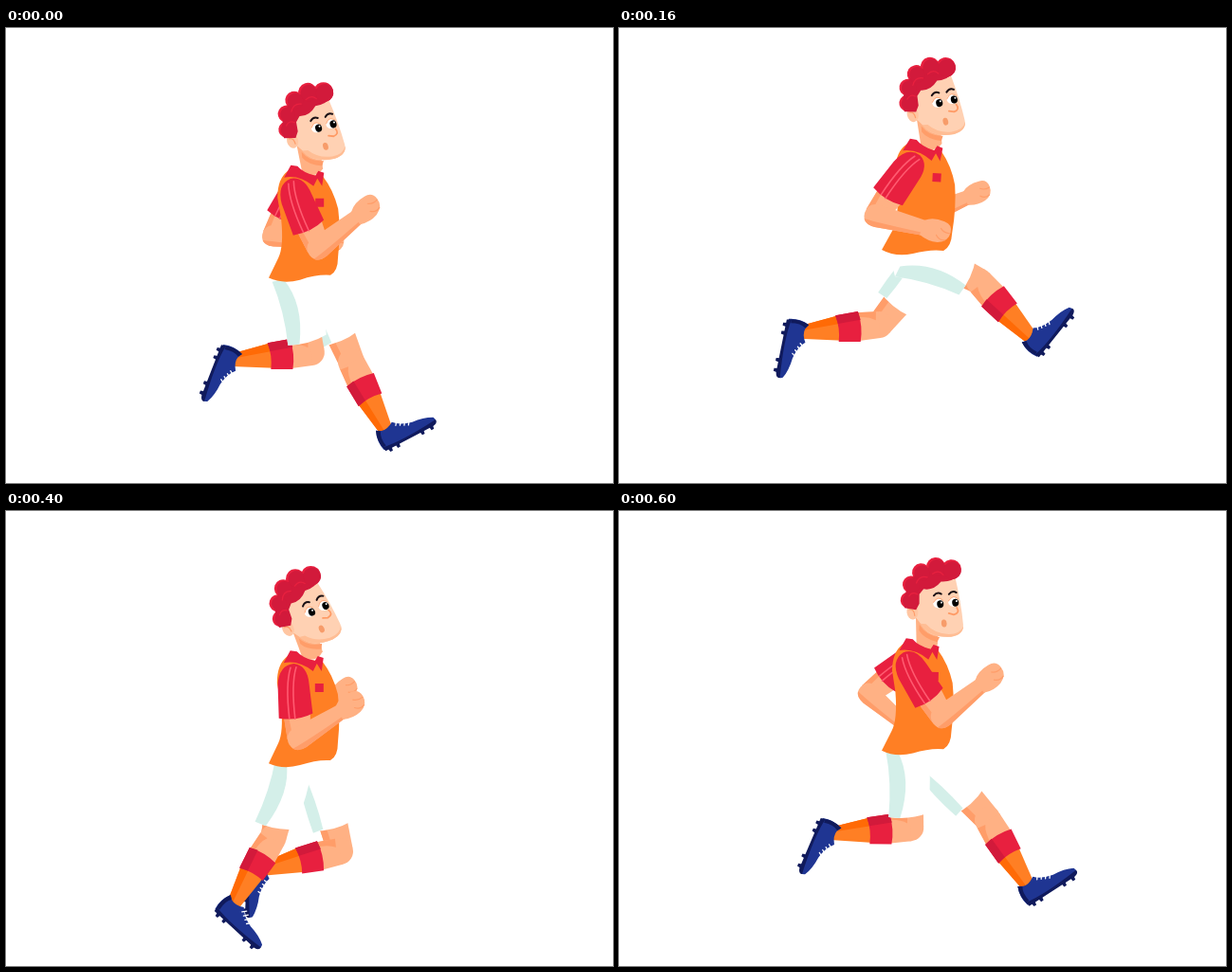
Animation, 640 px wide and 480 px high, one loop 0.64 s. Source, as an HTML page with a canvas:

```html
<!DOCTYPE html>
<html lang="en">
<head>
<meta charset="utf-8">
<title>Running player</title>
<style>
html, body { margin: 0; overflow: hidden; background: #fff; }
canvas { display: block; }
</style>
</head>
<body>
<canvas id="stage" width="640" height="480"></canvas>
<script>
const ctx = document.getElementById('stage').getContext('2d');
const LOOP = 640, STEP = 40, RAD = Math.PI / 180;
const SKIN = '#ffb184', SHADE = '#ff9d69', FACE = '#ffd1b3', RED = '#e8203f', HAIR = '#d21a3b',
  ORANGE = '#ff7f24', DEEP = '#ff6a06', BLUE = '#1f3592', NAVY = '#101a5c', MINT = '#d4efe9';

// A swing around a mean: each [cos, sin] pair is the next harmonic of the stride.
const swing = (mean, ...pairs) => phase => pairs.reduce((sum, [a, b], i) =>
  sum + a * Math.cos((i + 1) * phase) + b * Math.sin((i + 1) * phase), mean);

// Angles in degrees from straight down, forward positive.
const bounce = swing(251.8, [.2, -3.9], [11.7, 11.7]);
const nod = swing(-13.3, [-.4, -1.4], [-1.7, -12.6]);
const nearArm = {
  size: 1,
  upper: swing(-3.5, [28.5, -30.5], [1.8, 6.4], [-3.3, -4.3]),
  fore: swing(106, [23.5, -26], [3.5, 15.4], [-4, -2.5])
};
const farArm = {
  size: .93,
  upper: swing(-6.7, [-26.1, 24.6], [1.2, 9], [4.6, 6.5]),
  fore: swing(102, [-24.8, 21.5], [1.9, 26], [4.8, 5.3])
};
const nearLeg = {
  length: 89, flex: 1.28, shorts: nearShorts,
  thigh: swing(20.4, [-2.5, 39.7], [-3.7, -6.2]),
  calf: swing(-28.2, [-50.1, 53.5], [-8.1, -8], [1.8, -9])
};
const farLeg = {
  length: 88, flex: 1.16, shorts: farShorts,
  thigh: swing(3.7, [22.7, -45.1], [-2.9, -4.4]),
  calf: swing(-40.6, [72.3, -39.8], [-7.4, -6.8], [2.3, 11.8])
};

function at(x, y, deg, draw) {
  ctx.save();
  ctx.translate(x, y);
  ctx.rotate(deg * RAD);
  draw();
  ctx.restore();
}

function fill(color, d) {
  ctx.fillStyle = color;
  ctx.fill(new Path2D(d));
}

function line(color, width, d) {
  ctx.strokeStyle = color;
  ctx.lineWidth = width;
  ctx.lineCap = 'round';
  ctx.stroke(new Path2D(d));
}

function oval(color, x, y, rx, ry = rx) {
  ctx.fillStyle = color;
  ctx.beginPath();
  ctx.ellipse(x, y, rx, ry, 0, 0, 7);
  ctx.fill();
}

function boot() {
  for (const x of [-7, 2, 31, 42]) fill(NAVY, `M${x} 14h5l-1 6h-3z`);
  fill(BLUE, 'M-9 -7Q-14 4 -11 15L47 16Q54 15 51 9Q42 4 29 3Q16 0 10 -7Q2 -2 -4 -4Z');
  fill(NAVY, 'M-11 12Q10 16 52 12Q53 16 47 17L-10 17ZM-9 -7Q-13 2 -11 12L-7 12Q-9 2 -5 -4Z');
  for (let i = 0; i < 4; i++) line('#fff', 1.3, `M${12 + 4 * i} ${-2 + 2 * i}l3 -4`);
}

function leg({ thigh, calf, length, flex, shorts }, phase, x, y) {
  const hip = thigh(phase), shin = calf(phase);
  at(x, y, -hip, () => {
    fill(SKIN, `M-15 45H17L14 ${length}H-13Z`);
    fill(SHADE, `M-15 45H-8L-6 ${length}H-13Z`);
    at(0, length, hip - shin, () => {
      oval(SKIN, 0, 0, 14);
      fill(SKIN, 'M-14 0L-15 24H15L14 0Z');
      fill(SHADE, 'M-14 2L-15 24H-10Q-10 10 -5 3Z');
      fill(ORANGE, 'M-14 40L-6 85H7L13 40Z');
      fill(DEEP, 'M-14 40L-6 85H-1L-5 40Z');
      fill(RED, 'M-16 21Q0 17 16 21L14 44Q0 41 -14 45Z');
      fill(HAIR, 'M-16 21L-7 19L-5 43L-14 45Z');
      // The sole tips down as the shin folds back.
      at(0, 83, shin + 3 - flex * shin, boot);
    });
    shorts(hip);
  });
}

function farShorts() {
  fill('#fff', 'M-22 2L-23 60Q0 66 18 61L24 0L0 -28Z');
  fill(MINT, 'M-22 0Q-25 30 -22 62L-11 61Q-10 30 -15 0Z');
}

function nearShorts(hip) {
  const seat = -18 - .26 * hip, mid = (seat - 22) / 2;
  const back = `M${seat} 7Q${mid + 5} 40 -22 76`;
  fill('#fff', back + 'Q0 81 20 75Q27 40 25 0L0 -22Z');
  fill(MINT, back + `L-10 78Q${mid + 27} 38 ${seat + 12} 7Z`);
}

function arm({ upper, fore, size }, phase, x, y) {
  const shoulder = upper(phase), elbow = fore(phase);
  at(x, y, -shoulder, () => {
    ctx.scale(size, size);
    fill(SKIN, 'M-14 36L-12 66H12L15 36Z');
    fill(SHADE, 'M-14 38L-12 66H-6L-9 38Z');
    at(0, 66, shoulder - elbow, () => {
      fill(SKIN, 'M-12 2Q-12 -12 0 -12Q12 -11 12 2L8 54H-8Z');
      fill(SHADE, 'M-12 2Q-12 -8 -6 -11Q-7 6 -5 54H-8Z');
      fill(SKIN, 'M-8 50Q-13 60 -11 70Q-8 81 2 81Q11 81 12 72Q14 59 8 51Z');
      line(SHADE, 1.2, 'M-7 77Q-9 71 -4 67M1 80Q0 74 4 70');
    });
    fill(RED, 'M-19 43L-17 8Q-14 -13 2 -13Q16 -10 16 10L17 41Q0 48 -19 43Z');
    line('#ff5a70', 1.6, 'M-8 44Q-9 8 -2 -9M-2 45Q-3 8 4 -9');
  });
}

function torso() {
  fill(ORANGE, 'M297 152Q286 160 286 180L290 203Q293 232 287 244L277 265' +
    'Q292 272 310 267Q328 261 342 262Q350 258 350 243Q353 215 350 192Q345 172 334 158Z');
  fill(RED, 'M300 146L293 159Q309 156 324 168L328 160L333 168L335 154L329 152L326 157Q313 154 307 147Z');
  fill(RED, 'M326 181h9v9h-9z');
}

function head() {
  fill(SKIN, 'M317 96L315 124Q326 136 337 127L339 112Z');
  fill(SHADE, 'M320 104Q326 117 340 119L337 124Q323 119 319 110Z');
  fill(FACE, 'M316 80L330 60L362 56Q366 85 366 108Q366 119 352 120Q328 119 322 104L317 96Z');
  fill('#ffbd94', 'M321 103Q328 119 352 120Q365 119 366 110Q362 118 350 117Q335 115 327 104Z');
  oval('#ffc6a2', 314, 90, 6, 8);
  line(SHADE, 1.2, 'M311 87Q316 87 316 94');

  for (const x of [342, 358]) {
    oval('#fff', x, 83.5, 5.5, 5);
    line('#ffab7d', 1, `M${x - 5} 82Q${x} 75 ${x + 5} 81`);
    line('#1a1015', 2, `M${x - 4} 75Q${x} 71 ${x + 4} 74`);
    oval('#000', x + 2, 84.5, 3.5, 4);
    oval('#fff', x + 3.4, 83, 1);
  }
  line('#ff9a64', 1.8, 'M361 90Q364 96 357 97L352 95');
  oval('#f79c6a', 346, 105, 2.8, 4);

  const curls = (color, shift, shrink) => {
    for (let i = 0; i < 5; i++) {
      const a = (180 + 30 * i) * RAD;
      oval(color, 343 + 32 * Math.cos(a) + shift, 77 + 32 * Math.sin(a) + shift, 8.5 + .5 * i - shrink);
    }
  };
  curls(RED, 0, 0);
  fill(HAIR, 'M313 60L325 46L355 44L368 55Q358 63 347 61Q338 70 328 67L323 72L322 82L318 88L306 85L306 75Z');
  curls(HAIR, 1, 1.2);
  line(RED, 1.2, 'M321 60Q325 52 333 55M339 52Q346 48 350 54M312 73Q316 68 321 72');
}

function frame(now) {
  const phase = Math.floor(now % LOOP / STEP) * STEP / LOOP * 2 * Math.PI;
  const y = bounce(phase), lean = (265 - y) * .115;
  ctx.fillStyle = '#fff';
  ctx.fillRect(0, 0, 640, 480);

  const onBody = draw => at(313, y, lean, draw);
  onBody(() => arm(farArm, phase, -4, -99));
  leg(farLeg, phase, 329, y + 8);
  leg(nearLeg, phase, 300, y - 8);
  onBody(() => {
    at(4.5, -118, nod(phase) - lean, () => {
      ctx.translate(-322, -120);
      head();
    });
    at(-313, -265, 0, torso);
    arm(nearArm, phase, -10, -92);
  });
  requestAnimationFrame(frame);
}
frame(performance.now());
</script>
</body>
</html>
```
